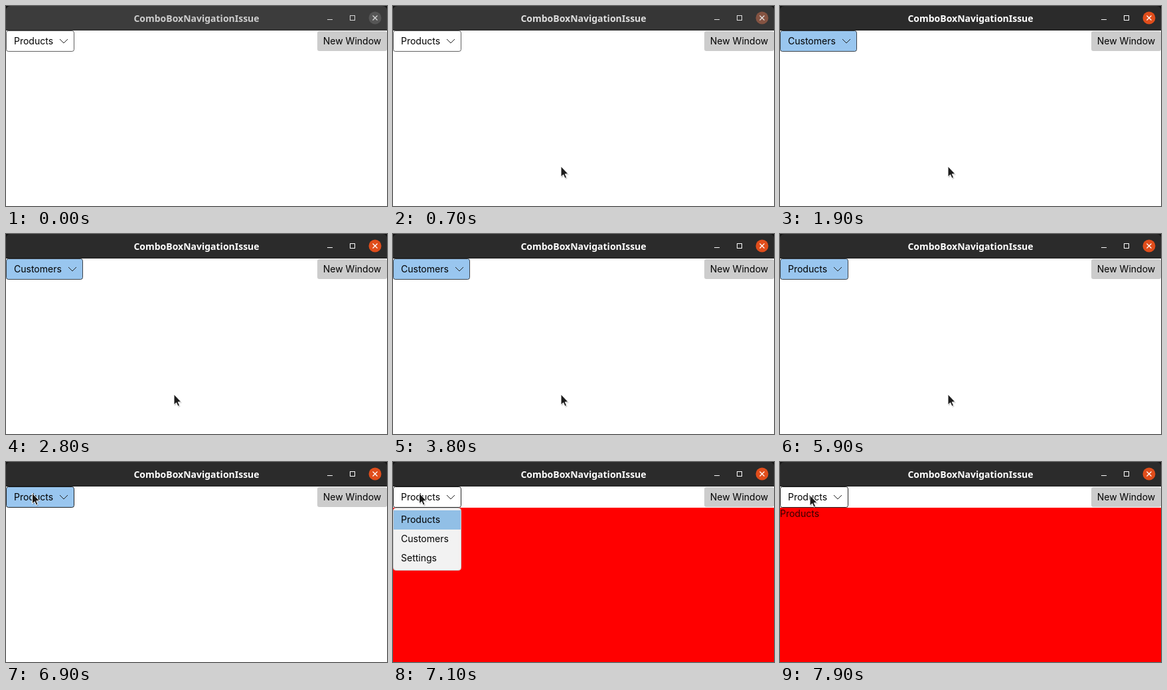
An HTML page that plays this animation: 574 by 302 pixels, repeating every 8000 ms.

```html
<!DOCTYPE html>
<html lang="en">
<head>
<meta charset="utf-8">
<title>Combo box navigation</title>
<style>
  html, body { margin: 0; width: 100%; height: 100%; overflow: hidden; background: #fff; }
  svg { display: block; font: 14px Inter, sans-serif; }
  #title { font: bold 14px "Noto Sans", sans-serif; }
</style>
</head>
<body>
<svg width="574" height="302" viewBox="0 0 574 302">
  <rect width="574" height="302" fill="#fff"/>
  <rect width="574" height="37" fill="#111"/>
  <path id="bar" d="M0 37V7Q0 0 7 0H567Q574 0 574 7V37Z"/>
  <path d="M0 36.5H574" stroke="#000" stroke-opacity=".4"/>
  <text id="title" x="287" y="24" text-anchor="middle">ComboBoxNavigationIssue</text>
  <circle id="close" cx="556" cy="18" r="9.5"/>
  <g id="icons" fill="none">
    <path d="M484 20.5H492"/>
    <rect x="518.5" y="14.5" width="7" height="7"/>
    <path d="M552.5 14.5L559.5 21.5M559.5 14.5L552.5 21.5" stroke-width="1.3"/>
  </g>

  <g id="page">
    <rect y="69" width="574" height="233" fill="#f00"/>
    <text id="heading" y="83" fill="#300">Products</text>
  </g>

  <rect x="469" y="38" width="105" height="30" rx="3" fill="#ccc"/>
  <text x="521.5" y="58" text-anchor="middle">New Window</text>

  <rect id="combo" x=".5" y="37.5" height="31" rx="3" stroke="#000"/>
  <text id="label" x="12" y="58"></text>
  <path id="chevron" d="M-22 50L-16 56L-10 50" fill="none" stroke="#222"/>

  <g id="popup">
    <rect x=".5" y="69.5" width="102" height="94" rx="4" fill="#f2f2f2" stroke="#ccc"/>
    <rect x="1" y="73" width="101" height="29" fill="#91bfe6"/>
    <text x="12" y="92">Products</text>
    <text x="12" y="121">Customers</text>
    <text x="12" y="150">Settings</text>
  </g>

  <g id="cursor">
    <path d="M0 0V16L3.7 12.8L6 18.2L8.6 17L6.3 11.8H11.2Z" transform="translate(1 1.5)" opacity=".2"/>
    <path d="M0 0V16L3.7 12.8L6 18.2L8.6 17L6.3 11.8H11.2Z" fill="#1c1c1c" stroke="#fff"/>
  </g>
</svg>
<script>
const LOOP = 8000, STEP = 100;
const $ = id => document.getElementById(id);
const set = (id, attrs) => {
  for (const name in attrs) $(id).setAttribute(name, attrs[name]);
};
const show = (id, on) => set(id, { visibility: on ? 'visible' : 'hidden' });
const clamp = v => Math.max(0, Math.min(1, v));
const smooth = v => v * v * (3 - 2 * v);
const mix = (a, b, k) => a.map((v, i) => v + (b[i] - v) * k);
const rgb = c => `rgb(${c.map(Math.round)})`;

const comboWidth = { Products: 103, Customers: 116, Settings: 98 };
const choices = [
  [0, 'Products'], [1700, 'Customers'], [2200, 'Settings'], [2600, 'Customers'],
  [3100, 'Products'], [3500, 'Customers'], [3900, 'Settings'],
  [4700, 'Customers'], [5100, 'Products']
];
// start, end, from, to
const moves = [
  [300, 500, [136, 190], [253, 242]],
  [5900, 6700, [253, 242], [39.5, 47]],
  [7400, 7700, [39.5, 47], [45, 50]]
];

function draw(t) {
  const active = clamp((t - 600) / 300);
  set('bar', { fill: rgb(mix([60, 60, 60], [43, 43, 43], active)) });
  set('title', { fill: rgb(mix([205, 205, 205], [255, 255, 255], active)) });
  set('close', { fill: rgb(mix([86, 86, 86], [224, 77, 27], active)) });
  set('icons', { stroke: rgb(mix([215, 215, 215], [255, 255, 255], active)) });

  const [start, end, from, to] = moves.findLast(m => t >= m[0]) || moves[0];
  const [x, y] = mix(from, to, smooth(clamp((t - start) / (end - start))));
  set('cursor', { transform: `translate(${x} ${y})` });
  show('cursor', t >= 300);

  const choice = choices.findLast(c => t >= c[0])[1];
  const width = comboWidth[choice];
  const opened = t >= 7100;
  const hover = x < width && y < 69;
  set('combo', {
    width: width - 1,
    fill: t >= 1400 && !opened ? '#99c6ef' : '#fff',
    'stroke-opacity': hover ? .85 : t >= 1400 ? .7 : .62
  });
  $('label').textContent = choice;
  set('chevron', { transform: `translate(${width} 0)` });
  show('page', opened);
  show('heading', t >= 7900);
  show('popup', opened && t < 7900);
}

const origin = performance.now();
function frame() {
  const t = (performance.now() - origin) % LOOP;
  draw(Math.floor(t / STEP) * STEP);
  requestAnimationFrame(frame);
}
frame();
</script>
</body>
</html>
```
